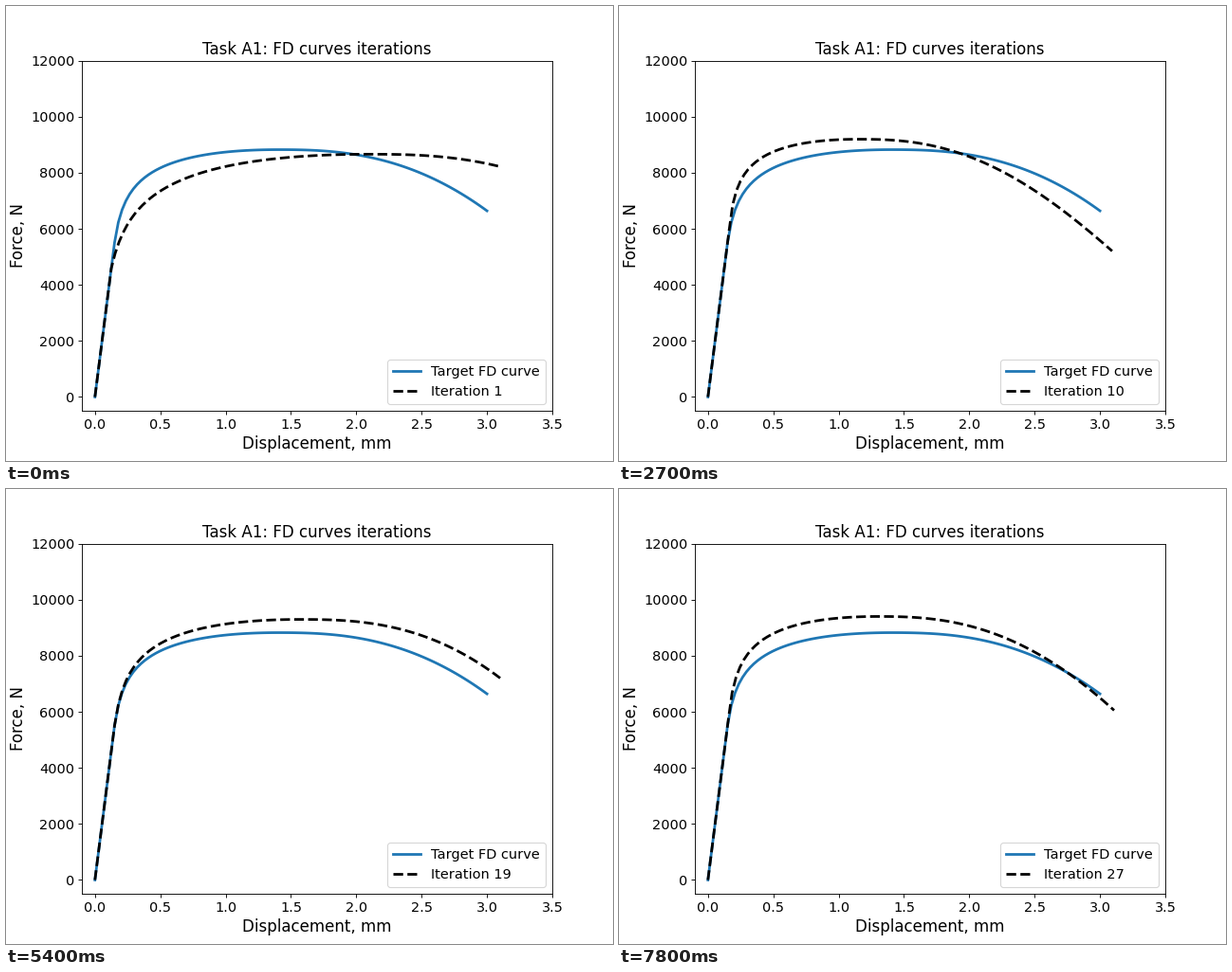
Recreate the animation shown at these times as a matplotlib script. Size 640 by 480 pixels, loop 8 s.

```python
import numpy as np
import matplotlib.pyplot as plt
from matplotlib.animation import FuncAnimation

FRAME_MS = 100
LOOP_MS = 8000
ITERATION_MS = 300
STIFFNESS = 36700  # N per mm in the elastic range

plt.rcParams["font.family"] = "DejaVu Sans"

# iteration: (yield displacement, peak displacement, peak force, final force)
KEYS = {
    1: (0.125, 2.10, 8660, 8235),
    7: (0.150, 1.15, 7995, 4715),
    10: (0.160, 1.15, 9195, 5205),
    12: (0.155, 1.30, 10250, 6500),
    14: (0.160, 1.05, 8915, 4600),
    19: (0.150, 1.57, 9295, 7200),
    22: (0.145, 1.55, 8085, 6203),
    27: (0.155, 1.30, 9400, 6050),
}


def force_curve(x_yield, x_peak, peak, final, x_end):
    """Elastic line, hardening up to the peak, then softening to the end."""
    x = np.linspace(x_yield, x_end, 100)

    span = x_peak - x_yield
    rise = peak - STIFFNESS * x_yield
    t = np.clip((x - x_yield) / span, 0, 1)
    hardening = rise * (1 - t) ** 2 / np.sqrt(1 + 0.008 * rise / span * t)

    s = np.clip((x - x_peak) / (x_end - x_peak), 0, 1)
    early = max(0, 2 * (1.45 - x_peak))  # early peaks soften sooner
    softening = (peak - final) * s ** 2.6 * (1 + early * (1 - s))

    return np.r_[0, x], np.r_[0, peak - hardening - softening]


def iteration_curve(n):
    params = [np.interp(n, list(KEYS), column)
              for column in zip(*KEYS.values())]
    return force_curve(*params, x_end=3.084 + 0.0009 * n)


fig, ax = plt.subplots(figsize=(8, 6), dpi=80)
fig.subplots_adjust(left=0.125, right=0.9, bottom=0.11, top=0.88)
ax.plot(*force_curve(0.15, 1.4, 8823, 6640, x_end=3.0),
        color="C0", lw=2.5, label="Target FD curve")
trial, = ax.plot([], [], "k--", lw=2.5, label="Iteration 1")
ax.set_xlim(-0.1, 3.5)
ax.set_ylim(-500, 12000)
ax.set_xticks(np.arange(0, 3.6, 0.5))
ax.set_yticks(np.arange(0, 12001, 2000))
ax.tick_params(labelsize=13)
ax.set_title("Task A1: FD curves iterations", fontsize=15)
ax.set_xlabel("Displacement, mm", fontsize=15)
ax.set_ylabel("Force, N", fontsize=15)
trial_label = ax.legend(loc="lower right", fontsize=13).get_texts()[1]


def update(frame):
    n = 1 + frame * FRAME_MS // ITERATION_MS
    trial.set_data(*iteration_curve(n))
    trial_label.set_text(f"Iteration {n}")
    return trial, trial_label


anim = FuncAnimation(fig, update, frames=LOOP_MS // FRAME_MS,
                     interval=FRAME_MS, repeat=True, repeat_delay=0)
plt.show()
```
